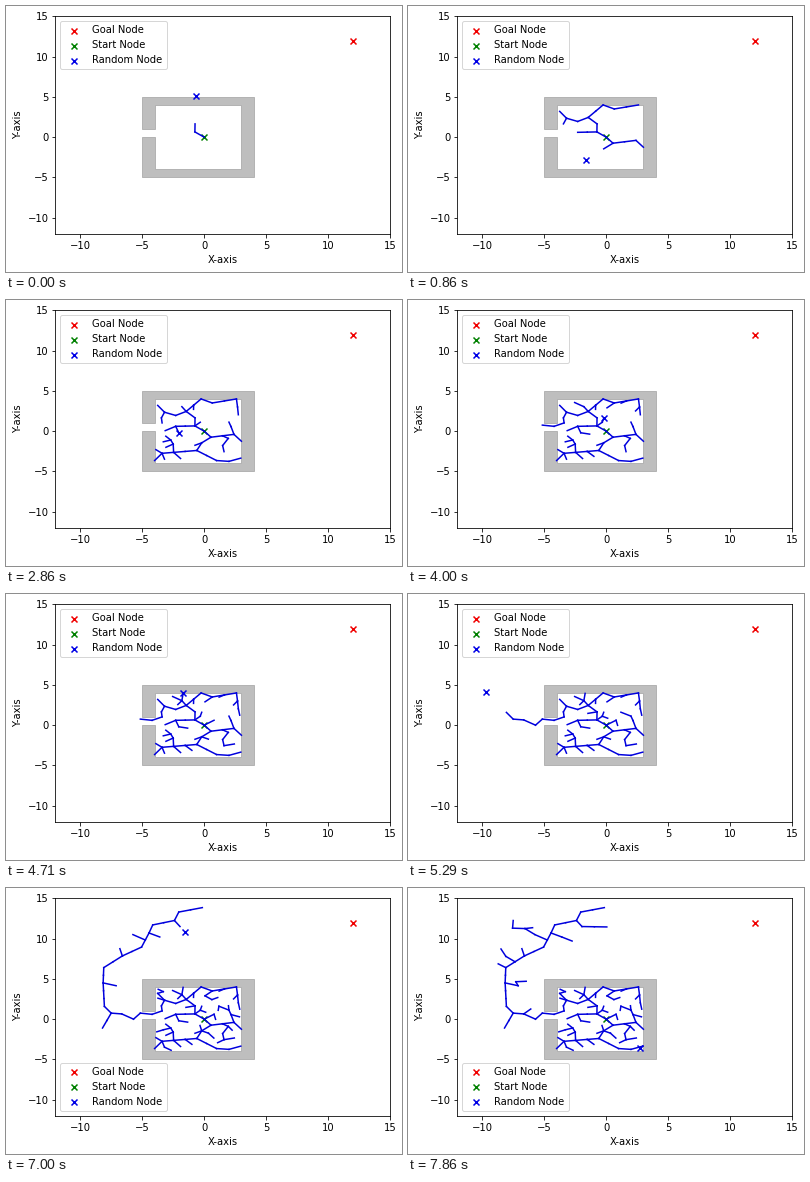
A matplotlib script for the animation above (8000 ms loop, 396 by 266 pixels).

```python
import random

import matplotlib.pyplot as plt
import numpy as np
from matplotlib.animation import FuncAnimation
from matplotlib.collections import LineCollection
from matplotlib.patches import Polygon

W, H, DPI = 396, 266, 72
FRAMES, LOOP_MS = 56, 8000
LEGEND_MOVE = 39
STEP, SPACING = 1, 0.5

# points are complex numbers, x + yj
START, GOAL = 0j, 12 + 12j
ROOM = (-3.9 - 3.95j, 3 + 3.95j)
LEFT_SIDE = (-9.2 + 1j, -5.2 + 12.5j)

rng = random.Random(11)
nodes = [START]
edges, aims = [], []
marks, counts = [], []


def xy(p):
    return p.real, p.imag


def nearest(p):
    return min(nodes, key=lambda n: abs(n - p))


def link(a, b, aim):
    nodes.append(b)
    edges.append((xy(a), xy(b)))
    aims.append(xy(aim))


def step_to(aim):
    base = nearest(aim)
    gap = aim - base
    return base, base + gap * min(1, STEP / max(abs(gap), 1e-9))


def extend(aim):
    """One step from the nearest node towards the sampled point."""
    link(*step_to(aim), aim)


def reach(*points):
    """A limb in even steps through the given points."""
    base = nearest(points[0])
    for p in points:
        n = max(1, round(abs(p - base) / STEP))
        move = (p - base) / n
        for _ in range(n):
            link(base, base + move, base + move * rng.uniform(1, 3))
            base += move


def wander(n, low, high):
    """Twigs towards random samples in a box, kept clear of each other."""
    while n:
        aim = complex(rng.uniform(low.real, high.real),
                      rng.uniform(low.imag, high.imag))
        base, tip = step_to(aim)
        inside = (low.real <= tip.real <= high.real
                  and low.imag <= tip.imag <= high.imag)
        if inside and abs(tip - nearest(tip)) > SPACING:
            link(base, tip, aim)
            n -= 1


def mark(frame):
    marks.append(frame)
    counts.append(len(edges))


reach(-.75 + .65j)
extend(-.7 + 5.1j)
mark(0)

# main limbs inside the room
reach(-1.45 + 2.45j, -.25 + 4j, .65 + 3.5j, 2.6 + 4j)
reach(-2.3 + .6j)
reach(-2.3 + 1.95j, -3.2 + 2.35j, -3.75 + 3.2j)
reach(-3.45 + 1.65j)
reach(.55 - .75j, 2.4 - .4j, 3 - 1.25j)
reach(-.2 - 1.45j, -.6 - 2.4j, -3.4 - 2.75j, -4 - 3.65j)
reach(1 - 3.65j)
reach(-2.5 - 1.6j)
wander(6, *ROOM)
extend(-2.7 - 1.1j)
mark(11)

wander(13, *ROOM)
reach(2 - 3.75j, 2.95 - 3.35j)
extend(-2.05 - .2j)
mark(20)

# out through the gap
wander(6, *ROOM)
reach(-4.2 + .6j, -5.15 + .75j)
extend(-.2 + 1.6j)
mark(28)

wander(10, *ROOM)
reach(-5.7 + 0j, -6.65 + .65j, -7.5 + .75j)
extend(-9.7 + 4.1j)
mark(37)

# up the left side
wander(4, *ROOM)
reach(-8.15 + 4.5j, -8.1 + 6.4j, -6.6 + 7.85j, -5.05 + 8.95j, -4.45 + 10.7j)
for twig in (-8.2 - 1.1j, -7.1 + 4.15j, -6.8 + 8.75j, -5.75 + 10.5j):
    reach(twig)
extend(-2.7 + 9.7j)
mark(42)

# over the top
wander(10, *ROOM)
reach(-4.15 + 11.7j, -2.4 + 12.25j, -2.05 + 13.3j, -.15 + 13.85j)
reach(-1.95 + 11.5j, .05 + 11.45j)
reach(-2.75 + 9.7j)
reach(-6.55 + 11.25j, -7.55 + 11.3j, -7.5 + 12.25j)
wander(7, *LEFT_SIDE)
extend(2.7 - 3.6j)
mark(FRAMES - 1)

SHOWN = np.round(np.interp(range(FRAMES), marks, counts)).astype(int)

fig = plt.figure(figsize=(W / DPI, H / DPI), dpi=DPI, facecolor="white")
ax = fig.add_axes([49.4 / W, 38.2 / H, 334.8 / W, 217.44 / H])
ax.set(xlim=(-12, 15), ylim=(-12, 15), xlabel="X-axis", ylabel="Y-axis")
ax.set_xticks(range(-10, 16, 5))
ax.set_yticks(range(-10, 16, 5))

wall = [(-5, 1), (-5, 5), (4, 5), (4, -5), (-5, -5), (-5, 0),
        (-4, 0), (-4, -4), (3, -4), (3, 4), (-4, 4), (-4, 1)]
ax.add_patch(Polygon(wall, facecolor="#bebebe", edgecolor="#a9a9a9", lw=0.8))

ax.scatter(*xy(GOAL), marker="x", color="#f00000", label="Goal Node")
ax.scatter(*xy(START), marker="x", color="green", label="Start Node")
probe = ax.scatter(0, 0, marker="x", color="#0000e6", label="Random Node")
tree = LineCollection([], colors="#0000dd", linewidths=1.5,
                      capstyle="projecting", zorder=2)
ax.add_collection(tree, autolim=False)
legend = ax.legend(loc="upper left")


def draw(frame):
    n = SHOWN[frame]
    tree.set_segments(edges[:n])
    probe.set_offsets([aims[n - 1]])
    legend.set_loc("upper left" if frame < LEGEND_MOVE else "lower left")
    return tree, probe, legend


anim = FuncAnimation(fig, draw, frames=FRAMES, interval=LOOP_MS / FRAMES,
                     repeat=True, repeat_delay=0, blit=False)
plt.show()
```
